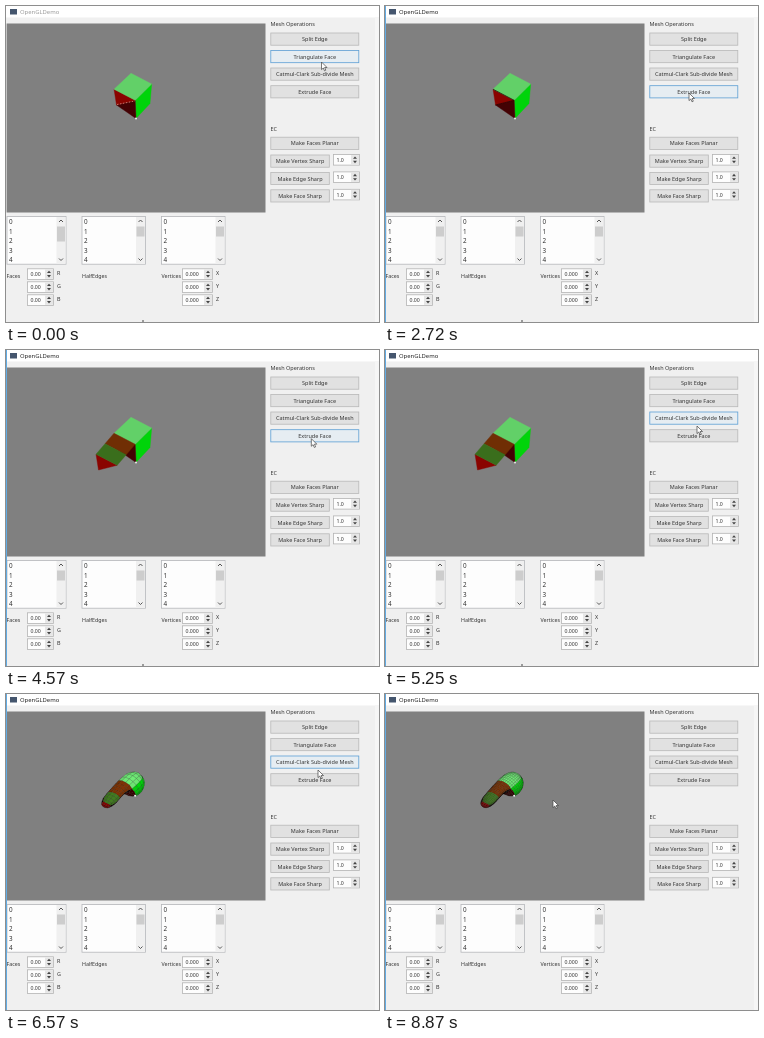
An HTML page that plays this animation: 373 px wide and 316 px high, repeating every 8.99 s.

```html
<!DOCTYPE html>
<html>
<head>
<meta charset="utf-8">
<style>
  html, body { margin: 0; width: 100%; height: 100%; overflow: hidden; background: #f0f0f0; }
  svg { display: block; width: 373px; height: 316px; }
  text { font-family: "Noto Sans", "Open Sans", sans-serif; fill: #333; }
</style>
</head>
<body>
<svg id="stage" viewBox="0 0 373 316">
  <g id="ui"></g>
  <rect id="border" width="1" height="316" fill="#62ace4"/>
  <g id="mesh"></g>
  <path id="tick" d="M137 314v2" stroke="#444" stroke-width="1"/>
  <path id="ghost" class="arrow"/>
  <path id="cursor" class="arrow"/>
</svg>
<script>
const LOOP = 8990;
const $ = id => document.getElementById(id);

// ---------- interface ----------
const rect = (x, y, w, h, fill, stroke = 'none', extra = '') =>
  `<rect x="${x}" y="${y}" width="${w}" height="${h}" fill="${fill}" stroke="${stroke}" stroke-width=".8" ${extra}/>`;
const text = (x, y, s, size = 5.5, extra = '') =>
  `<text x="${x}" y="${y}" font-size="${size}" ${extra}>${s}</text>`;
const chevron = (x, y, dir) =>
  `<path d="M${x - 2} ${y + dir}l2 ${-2 * dir}l2 ${2 * dir}" fill="none" stroke="#555" stroke-width="1"/>`;
const button = (y, label, w = 88, id = '') =>
  rect(264.8, y, w, 12.2, '#e1e1e1', '#b8b8b8', id && `id="${id}"`) +
  text(264.8 + w / 2, y + 8.1, label, 5.5, 'text-anchor="middle"');

function spinBox(x, y, w, value) {
  const ax = x + w - 4.5, my = y + 5.3;
  return rect(x, y, w, 10.6, '#fdfdfd', '#b4b4b4') + text(x + 3, y + 7.2, value, 5.2) +
    rect(x + w - 8.5, y + .6, 8, 9.4, '#e6e6e6') +
    `<path d="M${ax - 2} ${my - 1}l2 -2.4l2 2.4zM${ax - 2} ${my + 1}l2 2.4l2 -2.4z" fill="#444"/>`;
}

function listBox(x, w, id) {
  let s = rect(x, 210.4, w, 47.8, '#fdfdfd', '#b4b6ba') +
    rect(x + w - 9.5, 211, 9, 46.8, '#f0f0f0') +
    rect(x + w - 9, 220.5, 8, 10, '#cdcdcd', 'none', `id="${id}"`);
  for (let i = 0; i < 5; i++) s += text(x + 2, 218 + i * 9.5, i, 6.3);
  return s + chevron(x + w - 5, 215, 1) + chevron(x + w - 5, 253.5, -1);
}

const rows = (x, w, value, labels) => [...labels].map((c, i) =>
  spinBox(x, 262.8 + i * 13, w, value) + text(x + w + 3.5, 268.7 + i * 13, c, 5.4)).join('');

$('ui').innerHTML =
  rect(0, 0, 373, 316, '#f0f0f0') + rect(0, 0, 373, 11.5, '#fff') +
  rect(369, 11.5, 4, 304.5, '#f6f6f6') +
  rect(4, 3, 7, 5.5, '#45566e') + text(14, 8, 'OpenGLDemo', 5.9, 'id="title"') +
  rect(.6, 17.5, 258.9, 189, '#808080') +
  text(264.5, 19.7, 'Mesh Operations') +
  button(27, 'Split Edge') +
  button(44.5, 'Triangulate Face', 88, 'triangulate') +
  button(62, 'Catmul-Clark Sub-divide Mesh', 88, 'subdivide') +
  button(79.7, 'Extrude Face', 88, 'extrude') +
  text(264.5, 124.8, 'EC') +
  button(131.2, 'Make Faces Planar') +
  ['Vertex', 'Edge', 'Face'].map((name, i) =>
    button(149 + i * 17.4, `Make ${name} Sharp`, 58.5) +
    spinBox(327.5, 148.5 + i * 17.4, 26, '1.0')).join('') +
  listBox(1, 59, 'faceThumb') + listBox(76, 63.5, 'edgeThumb') + listBox(155.5, 63.5, 'vertexThumb') +
  text(.5, 271.8, 'Faces', 5.3) + text(76, 271.8, 'HalfEdges', 5.3) + text(155.5, 271.8, 'Vertices', 5.3) +
  rows(21.5, 26, '0.00', 'RGB') + rows(176.5, 30, '0.000', 'XYZ');

for (const arrow of document.querySelectorAll('.arrow')) {
  arrow.setAttribute('d', 'M0 0V7.6L1.8 6L3 8.8L4.3 8.2L3.1 5.5H5.5Z');
  arrow.setAttribute('fill', '#fff');
  arrow.setAttribute('stroke', '#444');
  arrow.setAttribute('stroke-width', '.7');
}

// ---------- mesh: vertices are screen x, y and depth towards the viewer ----------
const RED = [138, 4, 0], BROWN = [112, 46, 4], OLIVE = [58, 110, 28], BLACK = [25, 12, 8];
const cube = {
  verts: [[108, 83.2, 0], [125, 67.3, -14], [145.7, 78, -4], [129.2, 94.3, 10],
          [110.5, 99, -20], [130, 112.5, -10], [144, 97.5, -24], [126, 85, -34]],
  faces: [
    { v: [0, 3, 4], color: RED },
    { v: [3, 5, 4], color: [68, 2, 4] },
    { v: [0, 1, 2, 3], color: [98, 208, 104] },
    { v: [3, 2, 6, 5], color: [0, 212, 10] },
    { v: [0, 4, 7, 1], color: [0, 110, 0] },
    { v: [1, 7, 6, 2], color: [0, 120, 0] },
    { v: [4, 5, 6, 7], color: BLACK }
  ]
};

const mean = points => [0, 1, 2].map(k => points.reduce((s, p) => s + p[k], 0) / points.length);

function extrude({ verts, faces }, color) {
  const base = faces[0].v, first = verts.length;
  const top = base.map((_, i) => first + i);
  const moved = base.map(i => [verts[i][0] - 9, verts[i][1] + 10.5, verts[i][2] + 7]);
  const sides = base.map((u, i) => {
    const j = (i + 1) % base.length;
    return { v: [u, base[j], top[j], top[i]], color: i ? BLACK : color };
  });
  return { verts: [...verts, ...moved], faces: [{ v: top, color: RED }, ...faces.slice(1), ...sides] };
}

// Catmull-Clark on a closed mesh; the old vertices keep their indices
function subdivide({ verts, faces }) {
  const centers = faces.map(f => mean(f.v.map(i => verts[i])));
  const edges = new Map(), around = verts.map(() => ({ faces: [], mids: [] }));
  const key = (a, b) => a < b ? a + ',' + b : b + ',' + a;
  faces.forEach((f, n) => f.v.forEach((a, i) => {
    const b = f.v[(i + 1) % f.v.length], k = key(a, b);
    around[a].faces.push(centers[n]);
    if (!edges.has(k)) {
      edges.set(k, { ends: [verts[a], verts[b]], centers: [] });
      const mid = mean([verts[a], verts[b]]);
      around[a].mids.push(mid);
      around[b].mids.push(mid);
    }
    edges.get(k).centers.push(centers[n]);
  }));
  const out = verts.map((p, i) => {
    const n = around[i].mids.length, f = mean(around[i].faces), m = mean(around[i].mids);
    return p.map((c, k) => (f[k] + 2 * m[k] + (n - 3) * c) / n);
  });
  for (const e of edges.values()) e.index = out.push(mean([...e.ends, ...e.centers])) - 1;
  const next = [];
  faces.forEach((f, n) => {
    const center = out.push(centers[n]) - 1, len = f.v.length;
    f.v.forEach((a, i) => next.push({
      v: [a, edges.get(key(a, f.v[(i + 1) % len])).index, center,
          edges.get(key(f.v[(i + len - 1) % len], a)).index],
      color: f.color
    }));
  });
  return { verts: out, faces: next };
}

function normal(p) {
  const n = [0, 0, 0];
  p.forEach((a, i) => {
    const b = p[(i + 1) % p.length];
    n[0] += a[1] * b[2] - a[2] * b[1];
    n[1] += a[2] * b[0] - a[0] * b[2];
    n[2] += a[0] * b[1] - a[1] * b[0];
  });
  const len = Math.hypot(...n) || 1;
  return n.map(c => c / len);
}

function drawMesh({ verts, faces }, smooth) {
  const visible = faces.map(f => {
    const p = f.v.map(i => verts[i]);
    return { p, n: normal(p), z: mean(p)[2], color: f.color };
  }).filter(f => f.n[2] > 0).sort((a, b) => a.z - b.z);
  const polygons = visible.map(({ p, n, color }) => {
    const light = smooth ? .75 + .4 * Math.max(0, .9 * n[2] - .4 * n[1]) : 1;
    const fill = `rgb(${color.map(c => Math.min(255, Math.round(c * light)))})`;
    const points = p.map(q => q[0].toFixed(2) + ',' + q[1].toFixed(2)).join(' ');
    const stroke = smooth ? 'stroke="#000" stroke-opacity=".25"' : `stroke="${fill}"`;
    return `<polygon points="${points}" fill="${fill}" ${stroke} stroke-width=".4"/>`;
  }).join('');
  const [x, y] = verts[5];
  return polygons + `<circle cx="${x}" cy="${y}" r="1" fill="#eee"/>`;
}

const once = extrude(cube, BROWN), twice = extrude(once, OLIVE);
const level1 = subdivide(twice), level2 = subdivide(level1), level3 = subdivide(level2);
const diagonal = '<path d="M111 98.5L129 95" stroke="#e09080" stroke-width=".8" stroke-dasharray="1.5 1.5"/>';
const crease = '<path d="M108 83.2L129.2 94.3L110.5 99" fill="none" stroke="#200" stroke-width=".7"/>';
const stages = [
  [0, drawMesh(cube) + diagonal],
  [160, drawMesh(cube) + crease],
  [3000, drawMesh(once)],
  [4300, drawMesh(twice)],
  [5610, drawMesh(level1, true)],
  [6400, drawMesh(level2, true)],
  [6900, drawMesh(level3, true)]
];

// ---------- timeline ----------
const highlights = [[0, 'triangulate'], [450, 'subdivide'], [900, 'extrude'], [4800, 'subdivide'], [8030, '']];
const cursorPath = [[0, 315.5, 56], [160, 315.5, 56], [860, 304, 87], [2930, 304, 87], [3700, 302.5, 94],
                    [4250, 302.5, 94], [5140, 312, 76], [7930, 312, 76], [8210, 168, 106]];
const ghostPath = [[5610, 137, 314], [5950, 128, 292.5], [6200, 128, 292.5], [6490, 137, 316]];

const current = (list, t) => list.filter(item => item[0] <= t).pop()[1];

function along(path, t) {
  const i = path.findIndex(p => p[0] > t);
  if (i < 0) return path[path.length - 1].slice(1);
  if (i === 0) return path[0].slice(1);
  const [t0, x0, y0] = path[i - 1], [t1, x1, y1] = path[i];
  const u = (t - t0) / (t1 - t0), k = u * u * (3 - 2 * u);
  return [x0 + (x1 - x0) * k, y0 + (y1 - y0) * k];
}

const place = (id, path, t) => $(id).setAttribute('transform', `translate(${along(path, t)})`);
const show = (id, on) => $(id).setAttribute('visibility', on ? 'visible' : 'hidden');
let shown;

function render(now) {
  const t = now % LOOP, active = t >= 930, lit = current(highlights, t), mesh = current(stages, t);
  if (mesh !== shown) $('mesh').innerHTML = shown = mesh;
  for (const id of ['triangulate', 'subdivide', 'extrude']) {
    $(id).setAttribute('fill', id === lit ? '#e6edf2' : '#e1e1e1');
    $(id).setAttribute('stroke', id === lit ? '#5c9fd4' : '#b8b8b8');
  }
  $('title').style.fill = active ? '#222' : '#999';
  $('faceThumb').setAttribute('height', active ? 10 : 15);
  show('border', active);
  show('tick', t < 5610);
  show('ghost', t >= 5610 && t < 6490);
  place('ghost', ghostPath, t);
  place('cursor', cursorPath, t);
}

const start = performance.now();
function frame() {
  render(performance.now() - start);
  requestAnimationFrame(frame);
}
frame();
</script>
</body>
</html>
```
